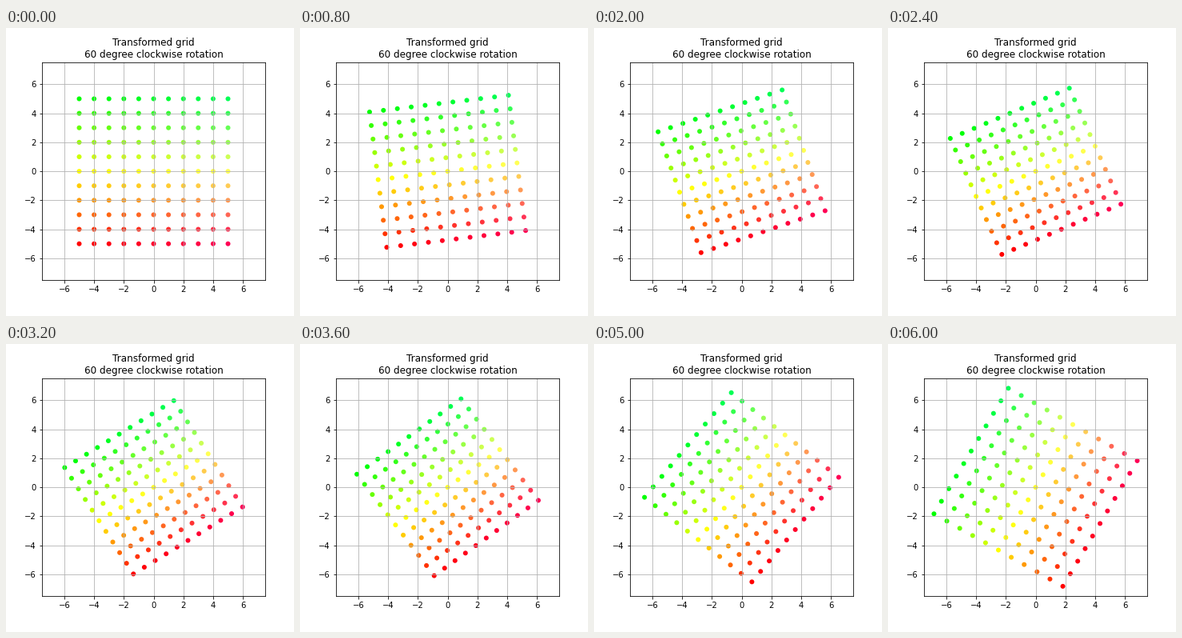
Animation, 360 px wide and 360 px high, one loop 6200 ms. Source, as a matplotlib script:

```python
import numpy as np
import matplotlib.pyplot as plt
from matplotlib.animation import FuncAnimation

FRAMES = 31
INTERVAL = 200
HALF = 5
LIMIT = 7.5


def colorize(x, y):
    r = np.minimum(1, 1 - y / HALF)
    g = np.minimum(1, 1 + y / HALF)
    b = (x + HALF) / 30
    return np.column_stack([r, g, b])


steps = np.arange(-HALF, HALF + 1)
xs, ys = np.meshgrid(steps, steps)
grid = np.vstack([xs.ravel(), ys.ravel()]).astype(float)

angle = np.radians(60)
rotation = np.array([[np.cos(angle), -np.sin(angle)],
                     [np.sin(angle), np.cos(angle)]])

plt.rcParams["font.family"] = "DejaVu Sans"
fig, ax = plt.subplots(figsize=(5, 5), dpi=72)
fig.subplots_adjust(left=0.125, right=0.9, bottom=0.125, top=0.88)
dots = ax.scatter(*grid, s=36, c=colorize(*grid), edgecolor="none")
ax.set_xlim(-LIMIT, LIMIT)
ax.set_ylim(-LIMIT, LIMIT)
ax.set_xticks(range(-6, 7, 2))
ax.set_yticks(range(-6, 7, 2))
ax.grid(True)
ax.set_title("Transformed grid\n60 degree clockwise rotation")


def update(i):
    # Blend linearly from the identity to the full rotation.
    t = i / (FRAMES - 1)
    matrix = (1 - t) * np.eye(2) + t * rotation
    dots.set_offsets((matrix @ grid).T)
    return (dots,)


anim = FuncAnimation(fig, update, frames=FRAMES, interval=INTERVAL,
                     repeat=True, repeat_delay=0, blit=False)
plt.show()
```
